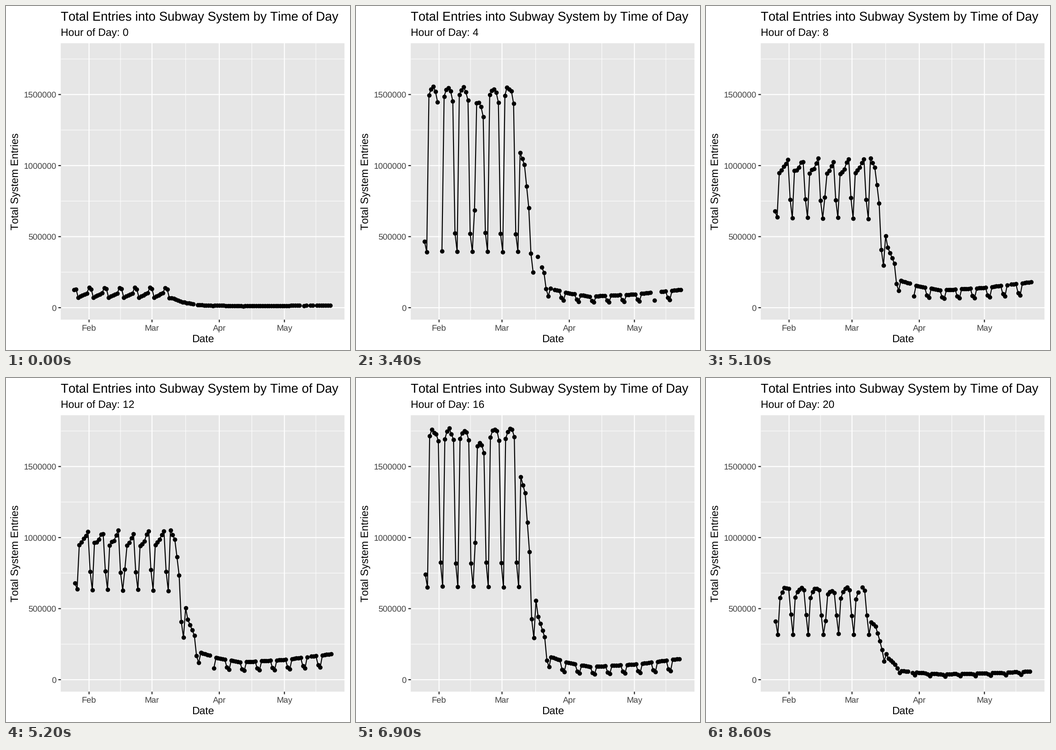
Write a matplotlib script that moves like this. It is 748 by 748 pixels and loops after 10000 ms.

```python
import matplotlib.pyplot as plt
import numpy as np
from matplotlib.animation import FuncAnimation
from matplotlib.patches import Rectangle

plt.rcParams["font.family"] = "Liberation Sans"
plt.rcParams["text.hinting"] = "no_hinting"
plt.rcParams["text.kerning_factor"] = 6   # plain advances, no pair kerning

SIZE, DPI = 748, 100
LEFT, TOP, RIGHT, BOTTOM = 119.5, 81, 736.5, 682
DAY0_X, DAY_W = 147.55, 4.72      # first Saturday, pixels per day
ZERO_Y, UNIT_H = 656, 0.309       # pixels per thousand entries
DAYS = 119
FALL_DAY, HOLIDAY = 44, 23
STEP = 17                         # animation frames per hour reading

TITLE, TEXT, SMALL = 27.5, 22.9, 18.3
MAJOR, MINOR, TICK, DOT = 2.2, 1.1, 5.7, 9.6
LABEL_GREY, TICK_GREY = "#3f3f3f", "#242424"

day = np.arange(DAYS)
weekday = day % 7                 # 0 is Saturday
rng = np.random.default_rng(4)

# Shared collapse and slow recovery of ridership, as a share of normal.
fall = np.interp(day, [44, 46, 48, 51, 52, 55, 58, 65, 76, 97, 118],
                 [1, .92, .63, .39, .31, .21, .112, .086, .063, .076, .104])


def pt(px):
    return px * 72 / DPI


def day_x(d):
    return DAY0_X + DAY_W * np.asarray(d)


def entries_y(thousands):
    return ZERO_Y - UNIT_H * np.asarray(thousands)


def entries(weekend, week, holiday, peak, fade, weekend_scale, missing):
    """Daily entries in thousands for one hour of the day.

    weekend: usual Saturday and Sunday; week: usual Monday, Wednesday, Friday;
    holiday: share of riders on the public holiday; peak: weekdays at the
    start of the collapse; fade: how strongly the hour follows the collapse.
    """
    bend = np.polyfit([2, 4, 6], week, 2)
    usual = np.where(weekday < 2, np.take(weekend, weekday % 2),
                     np.polyval(bend, weekday))
    usual *= 1 + rng.normal(0, 0.006, DAYS)
    usual[0] *= 0.9
    usual[HOLIDAY] *= holiday
    usual[HOLIDAY + 1:HOLIDAY + 5] *= 1 - 0.12 * (1 - holiday)

    fallen = np.where(weekday < 2, usual * weekend_scale, peak) * fall ** fade
    values = np.where(day < FALL_DAY, usual, fallen)
    values[missing] = np.nan
    return values


readings = [
    entries((141, 131), (72, 88, 102), 1, 68, 0.6, 0.45, [56, 105, 108, 111]),
    entries((155, 108), (540, 565, 526), 0.45, 905, 0.8, 2.6, [64, 105, 113]),
    entries((518, 395), (1488, 1546, 1445), 0.46, 1090, 0.95, 1.3,
            [7, 51, 53, 59, 105, 107, 108]),
    entries((765, 635), (950, 990, 1047), 0.82, 1053, 0.78, 0.85, [63, 108]),
    entries((820, 653), (1695, 1762, 1685), 0.57, 1427, 1, 0.95, [118]),
    entries((455, 318), (575, 640, 630), 0.73, 404, 0.85, 0.78, [39, 62, 118]),
]

fig = plt.figure(figsize=(SIZE / DPI, SIZE / DPI), dpi=DPI, facecolor="white")
ax = fig.add_axes([0, 0, 1, 1])
ax.set(xlim=(0, SIZE), ylim=(SIZE, 0))
ax.axis("off")


def line(xs, ys, color, width, z):
    ax.plot(xs, ys, color=color, lw=pt(width), zorder=z,
            solid_capstyle="butt", snap=False)


def label(x, y, text, size, color="black", ha="left", **kw):
    return ax.text(x, y, text, fontsize=pt(size), color=color, ha=ha,
                   va="baseline", **kw)


ax.add_patch(Rectangle((LEFT, TOP), RIGHT - LEFT, BOTTOM - TOP,
                       fc="#e6e6e6", lw=0, zorder=0))

# Grid, ticks and tick labels
months = {"Feb": 7, "Mar": 36, "Apr": 67, "May": 97}
for d in (21.5, 51.5, 82, 111.5):
    line([day_x(d)] * 2, [TOP, BOTTOM], "white", MINOR, 1)
for amount in range(250, 2000, 500):
    line([LEFT, RIGHT], [entries_y(amount)] * 2, "white", MINOR, 1)
for name, d in months.items():
    x = day_x(d)
    line([x, x], [TOP, BOTTOM], "white", MAJOR, 2)
    line([x, x], [BOTTOM, BOTTOM + TICK], TICK_GREY, MAJOR, 2)
    label(x, 706, name, SMALL, LABEL_GREY, "center")
for amount in range(0, 2000, 500):
    y = entries_y(amount)
    line([LEFT, RIGHT], [y, y], "white", MAJOR, 2)
    line([LEFT - TICK, LEFT], [y, y], TICK_GREY, MAJOR, 2)
    label(109.5, y + 6.6, str(amount * 1000), SMALL, LABEL_GREY, "right")

label(LEFT, 32.3, "Total Entries into Subway System by Time of Day", TITLE)
subtitle = label(LEFT, 65.2, "", TEXT)
label((LEFT + RIGHT) / 2, 732, "Date", TEXT, ha="center")
label(27.5, (TOP + BOTTOM) / 2, "Total System Entries", TEXT, ha="center",
      rotation=90, rotation_mode="anchor")

curve, = ax.plot([], [], "-o", color="black", lw=pt(MAJOR), ms=pt(DOT), mew=0,
                 zorder=3, snap=False)


def draw(frame):
    # The readings switch one frame ahead of the subtitle.
    index = min(frame // STEP, len(readings) - 1)
    curve.set_data(day_x(day + index / 6), entries_y(readings[index]))
    hour = 4 * max(0, (frame - 1) // STEP)
    subtitle.set_text(f"Hour of Day: {hour}")
    return curve, subtitle


anim = FuncAnimation(fig, draw, frames=100, interval=100, repeat=True,
                     repeat_delay=0)
plt.show()
```
